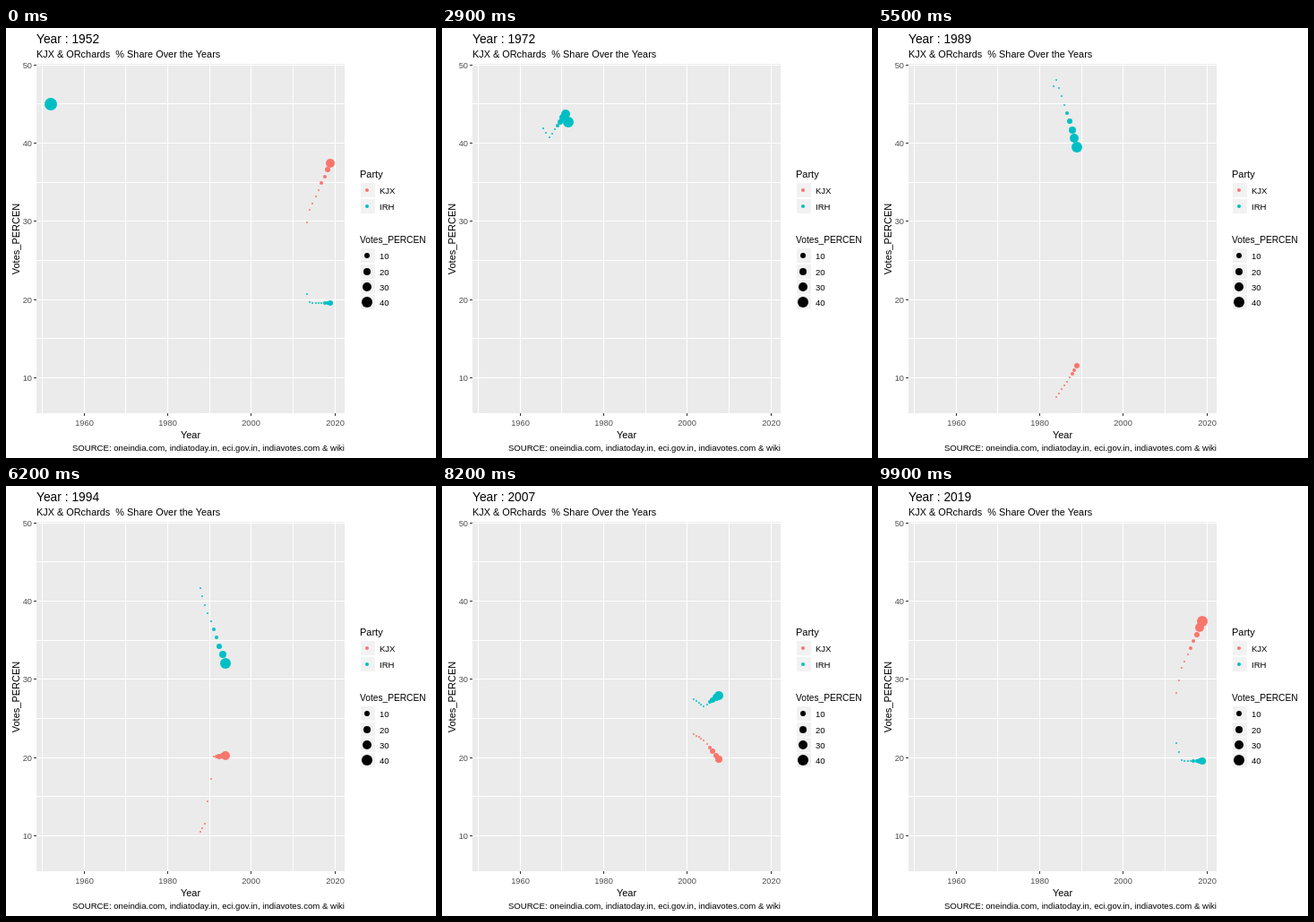
These frames come from a looping animation (480 by 480 pixels, 10000 ms). An HTML page:

```html
<!DOCTYPE html>
<html lang="en">
<head>
<meta charset="utf-8">
<title>Vote share by year</title>
<style>
  html, body { margin: 0; width: 100%; height: 100%; overflow: hidden; background: #fff; }
  svg { display: block; width: 480px; height: 480px; }
  text { font-family: "Liberation Sans", Arial, sans-serif; white-space: pre; }
  rect, line { shape-rendering: crispEdges; }
</style>
</head>
<body>
<svg id="chart" viewBox="0 0 480 480"></svg>
<script>
const NS = "http://www.w3.org/2000/svg";
const chart = document.getElementById("chart");
const FRAMES = 100, STEP = 100, WAKE = 10;
const LOW = 7.5, HIGH = 48.1;
const RED = "#F8766D", TEAL = "#00BFC4", GREY = "#4D4D4D";
const PANEL = { left: 34, top: 40, right: 378, bottom: 430 };

// Election years and vote shares; the later party joins part-way
const years = [1952, 1957, 1962, 1967, 1971, 1977, 1980, 1984, 1989, 1991, 1996, 1998, 1999, 2004, 2009, 2014, 2019];
const parties = [
  { name: "IRH", color: TEAL, shares: [45, 47.8, 44.7, 40.7, 43.7, 34.5, 42.7, 48.1, 39.5, 36.4, 28.8, 25.8, 28.3, 26.5, 28.5, 19.6, 19.5] },
  { name: "KJX", color: RED, shares: [7.5, 11.5, 20.1, 20.3, 25.6, 23.7, 22.2, 18.8, 31.4, 37.4] }
];
const first = years[0], span = years.at(-1) - first;

const xOf = year => PANEL.left + (year - 1948.65) * 4.668;
const yOf = share => PANEL.top + (50.11 - share) * 8.733;
const frameOf = year => Math.round((year - first) / span * (FRAMES - 1));
const sizeOf = share => 1 + 5 * Math.sqrt((share - LOW) / (HIGH - LOW));
const radius = size => Math.max(1, Math.round(size * 1.067 + 0.45));
const lerp = (a, b, t) => a + (b - a) * t;
const pixel = v => Math.floor(v + 0.25) + 0.5;

function add(tag, attrs, parent = chart) {
  const el = document.createElementNS(NS, tag);
  for (const key in attrs) el.setAttribute(key, attrs[key]);
  return parent.appendChild(el);
}
function label(str, x, y, size, more = {}) {
  const el = add("text", { x, y, "font-size": size, ...more });
  el.textContent = str;
  return el;
}
function line(x1, y1, x2, y2, stroke) {
  add("line", { x1, y1, x2, y2, stroke });
}
function dot(x, y, size, fill, parent) {
  add("circle", { cx: Math.round(x), cy: Math.round(y), r: radius(size), fill }, parent);
}

// Panel and grid: every second line carries a tick and a number
const { left, top: ceiling, right, bottom } = PANEL;
add("rect", { x: left, y: ceiling, width: right - left, height: bottom - ceiling, fill: "#EBEBEB" });
for (let year = 1950; year <= 2020; year += 10) {
  const x = pixel(xOf(year));
  line(x, ceiling, x, bottom, "#fff");
  if (year % 20) continue;
  line(x, bottom, x, bottom + 3, "#333");
  label(year, x, 444, 9.3, { fill: GREY, "text-anchor": "middle" });
}
for (let share = 10; share <= 50; share += 5) {
  const y = pixel(yOf(share));
  line(left, y, right, y, "#fff");
  if (share % 10) continue;
  line(left - 3, y, left, y, "#333");
  label(share, 29, y + 3.5, 9.3, { fill: GREY, "text-anchor": "end" });
}

// Titles
const title = label("", 34, 17, 13.8);
label("KJX & ORchards  % Share Over the Years", 34, 33, 10.9);
label("Year", 206, 458, 11, { "text-anchor": "middle" });
label("Votes_PERCEN", 0, 0, 11, { "text-anchor": "middle", transform: "translate(15 235.5) rotate(-90)" });
label("SOURCE: oneindia.com, indiatoday.in, eci.gov.in, indiavotes.com & wiki", right, 472, 9.6, { "text-anchor": "end" });

// Legends
function legend(heading, size, y, rows) {
  label(heading, 395, y, size);
  rows.forEach(([name, dotSize, color], i) => {
    const mid = Math.round(y + 14.3 + i * 17.28);
    add("rect", { x: 396, y: mid - 8, width: 16, height: 16, fill: "#F2F2F2" });
    dot(403, mid, dotSize, color);
    label(name, 417, mid + 4, 9.5);
  });
}
legend("Party", 11, 167, [...parties].reverse().map(p => [p.name, 1.4, p.color]));
legend("Votes_PERCEN", 10.2, 240, [10, 20, 30, 40].map(v => [v, sizeOf(v), "#000"]));

// Year and share move evenly between the rounded key frames
function stateAt(shares, frame) {
  const skip = years.length - shares.length;
  const next = Math.max(skip + 1, years.findIndex(year => frameOf(year) >= frame));
  const from = frameOf(years[next - 1]), to = frameOf(years[next]);
  if (frame < from) return null;
  const t = (frame - from) / (to - from);
  return {
    year: lerp(years[next - 1], years[next], t),
    share: lerp(shares[next - skip - 1], shares[next - skip], t)
  };
}

// Each dot drags a wake that shrinks cubically and wraps around the loop
const marks = add("g", {});
function draw(frame) {
  title.textContent = "Year : " + Math.round(first + span * frame / (FRAMES - 1));
  marks.replaceChildren();
  for (let age = WAKE - 1; age >= 0; age--) {
    const past = (frame - age + FRAMES) % FRAMES;
    const shrink = (1 - age / WAKE) ** 3;
    for (const { color, shares } of parties) {
      const s = stateAt(shares, past);
      if (s) dot(xOf(s.year), yOf(s.share), sizeOf(s.share) * shrink, color, marks);
    }
  }
}

const start = performance.now();
let shown = -1;
function tick() {
  const frame = Math.floor((performance.now() - start) / STEP) % FRAMES;
  if (frame !== shown) draw(shown = frame);
  requestAnimationFrame(tick);
}
tick();
</script>
</body>
</html>
```
